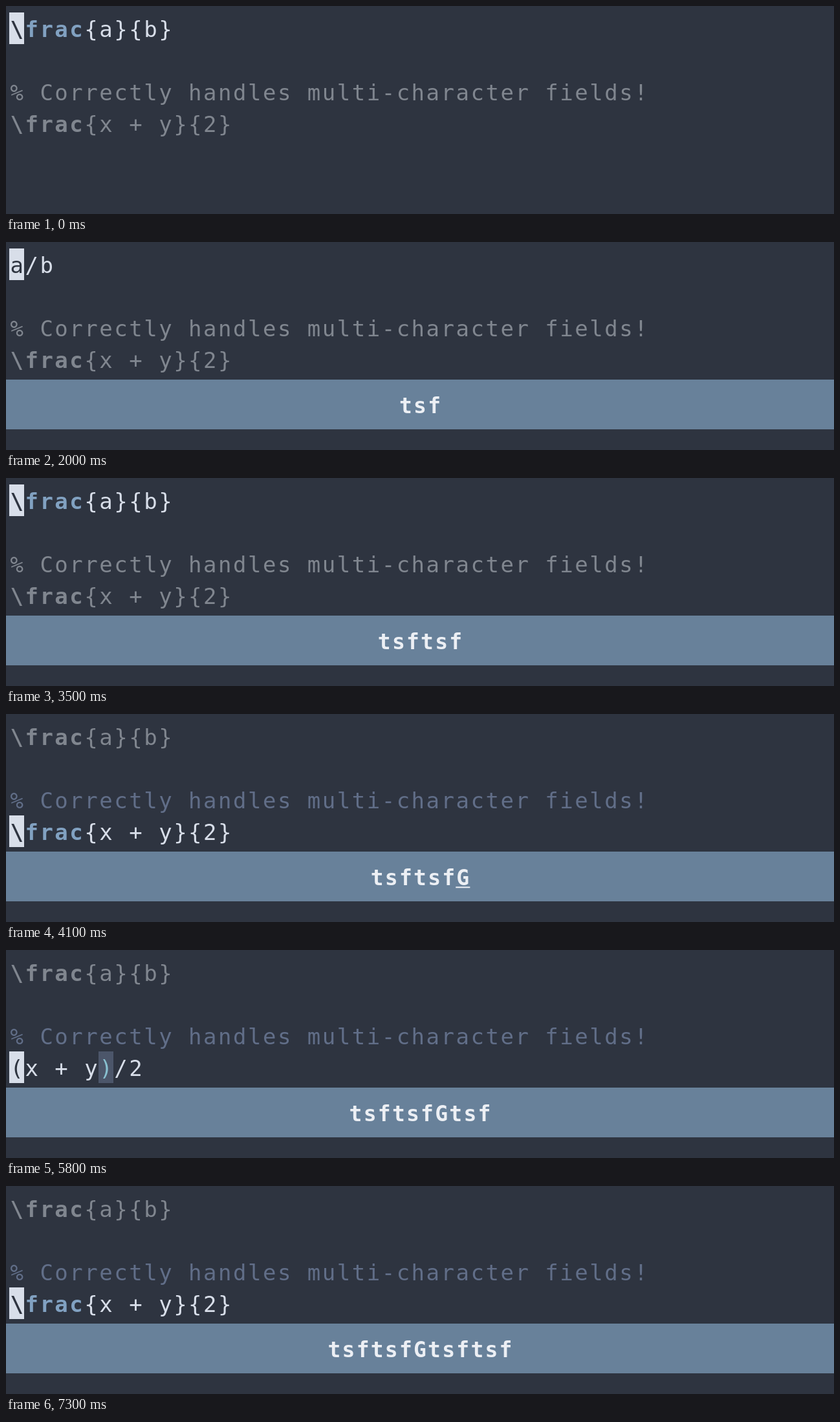
Recreate the animation shown at these times as an HTML page. Size 1280 by 322 pixels, loop 8 s.

```html
<!DOCTYPE html>
<html lang="en">
<head>
<meta charset="utf-8">
<title>Toggling fractions</title>
<style>
  html, body { margin: 0; width: 100%; height: 100%; overflow: hidden; background: #2e3440; }
  svg { display: block; width: 100vw; height: 100vh; }
  text { font-family: "DejaVu Sans Mono", "Noto Sans Mono", monospace; white-space: pre; }
  .code { font-size: 34px; letter-spacing: 2.5px; fill: #d8dee9; }
  .keys { font-size: 33px; letter-spacing: 2.23px; font-weight: 700; fill: #eceff4; }
  .command { fill: #81a1c1; font-weight: 700; }
  .comment { fill: #616e88; }
  .paren { fill: #88c0d0; }
  .dim, .dim tspan { fill: #80868f; }
  .under { fill: #2e3440; }
</style>
</head>
<body>
<svg viewBox="0 0 1280 322" xmlns="http://www.w3.org/2000/svg">
  <rect width="1280" height="322" fill="#2e3440"/>
  <g id="editor"></g>
  <g id="overlay"></g>
</svg>
<script>
const LOOP = 8000;
const CELL = 22.97, LEFT = 5.2, TOP = 10, ROW = 49;
const KEY = 22.1, KEY_HOLD = 200;

const KEYS = "tsftsfGtsftsf";
const PRESSES = [1100, 1500, 1800, 2600, 2900, 3300, 4100, 4900, 5300, 5600, 6500, 6800, 7100];

const within = (t, from, to) => t >= from && t < to;
const span = (cls, text) => `<tspan class="${cls}">${text}</tspan>`;
const rect = (x, y, w, h, fill) =>
  `<rect x="${x}" y="${y}" width="${w}" height="${h}" fill="${fill}"/>`;
const cell = (col, row, fill) =>
  rect(Math.round(LEFT + col * CELL), TOP + row * ROW, 23, ROW, fill);

// Splits a line into the character under the cursor, the command and the rest.
function highlight(line, focused) {
  const cursor = c => focused ? span("under", c) : c;
  if (line[0] === "\\") {
    return `<tspan font-weight="700">${cursor("\\")}</tspan>` +
      span("command", line.slice(1, 5)) + line.slice(5);
  }
  if (line[0] === "%") return span("comment", line);
  return cursor(line[0]) + line.slice(1).replace(")", span("paren", ")"));
}

function codeLine(line, row, focused, dim) {
  const y = TOP + row * ROW + 38;
  return `<text class="code${dim ? " dim" : ""}" x="${LEFT + 1.25}" y="${y}">` +
    highlight(line, focused) + "</text>";
}

function drawEditor(t) {
  const first = within(t, 1900, 3300) ? "a/b" : "\\frac{a}{b}";
  const last = within(t, 5600, 7200) ? "(x + y)/2" : "\\frac{x + y}{2}";
  const lower = t >= 4100;
  const close = last.indexOf(")");
  return cell(0, lower ? 3 : 0, "#d8dee9") +
    (close > 0 ? cell(close, 3, "#4c566a") : "") +
    codeLine(first, 0, !lower, lower) +
    codeLine("% Correctly handles multi-character fields!", 2, false, !lower) +
    codeLine(last, 3, lower, !lower);
}

function drawOverlay(t) {
  const count = PRESSES.filter(p => t >= p).length;
  if (!count) return "";
  const x = 640 - count * KEY / 2;
  const held = t < PRESSES[count - 1] + KEY_HOLD;
  return rect(0, 213, 1280, 77, "#68819a") +
    `<text class="keys" x="${x + 1.1}" y="264.5">${KEYS.slice(0, count)}</text>` +
    (held ? rect(x + (count - 1) * KEY, 267.3, KEY, 2, "#eceff4") : "");
}

function update(id, markup) {
  const node = document.getElementById(id);
  if (node.markup !== markup) node.innerHTML = node.markup = markup;
}

function render(t) {
  update("editor", drawEditor(t));
  update("overlay", drawOverlay(t));
}

let start;
function tick(now) {
  start ??= now;
  render(Math.max(0, now - start) % LOOP);
  requestAnimationFrame(tick);
}
render(0);
requestAnimationFrame(tick);
</script>
</body>
</html>
```
